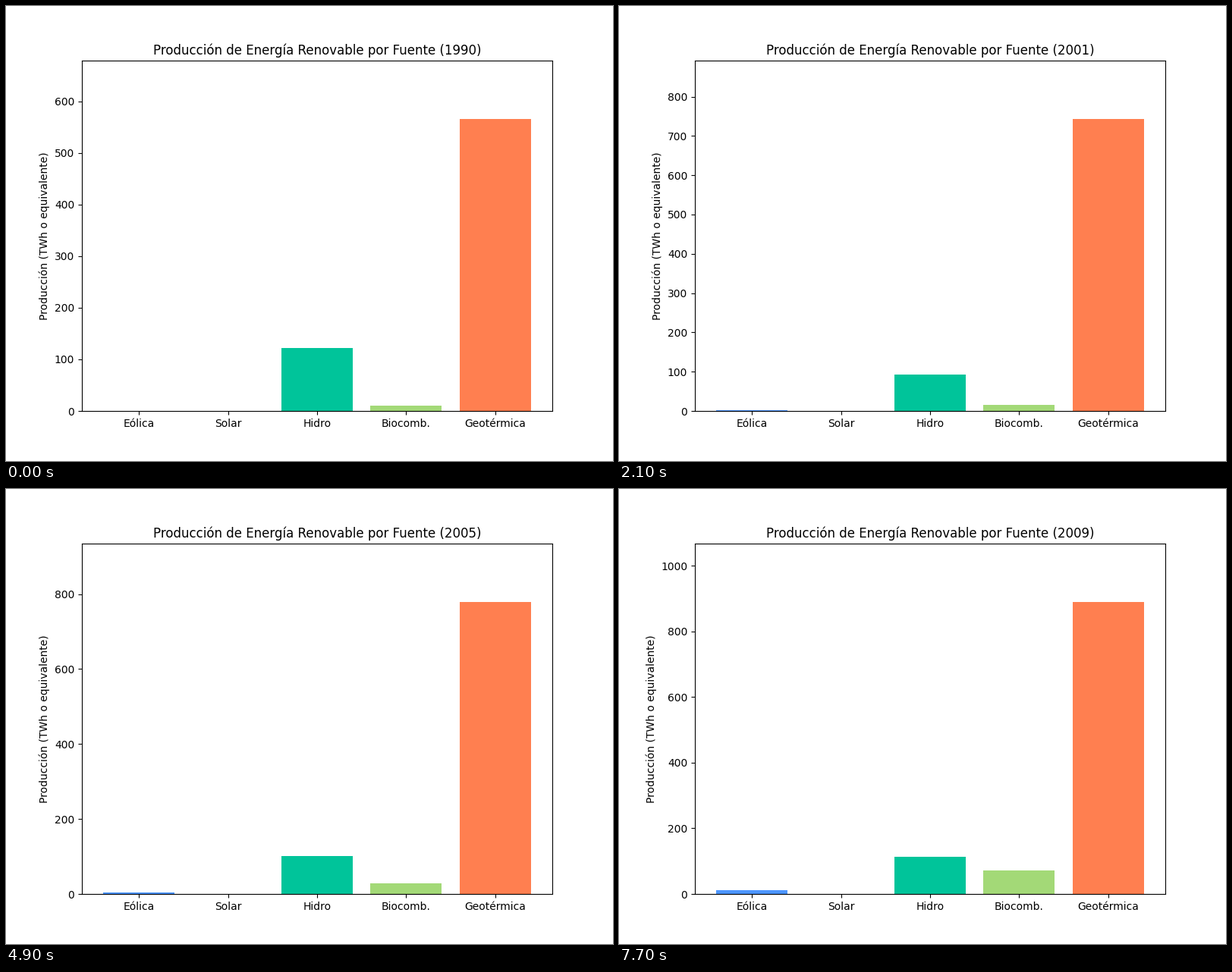
Recreate the animation shown at these times as a matplotlib script. Size 800 by 600 pixels, loop 8000 ms.

```python
import matplotlib.pyplot as plt
import numpy as np
from matplotlib.animation import FuncAnimation

TICK = 100   # ms per frame
HOLD = 7     # frames each year stays
LOOP = 80    # frames per loop
YEARS = [1990, 1995, *range(2000, 2010)]


def growth(start, rate):
    """Steady yearly growth, with its start value in 2000."""
    return lambda year: start * rate ** (year - 2000)


def trend(points):
    """Straight lines through a few key years."""
    return lambda year: np.interp(year, list(points), list(points.values()))


def log_trend(points):
    """Constant growth rates between a few key years."""
    line = trend({year: np.log(value) for year, value in points.items()})
    return lambda year: np.exp(line(year))


# label: (color, yearly output)
SOURCES = {
    "Eólica": ("#4d96ff", growth(1.25, 1.273)),
    "Solar": ("#ffd93d", growth(0.04, 1.38)),
    "Hidro": ("#00c49a", trend({1990: 122, 1995: 91, 2002: 93.9, 2009: 112.6})),
    "Biocomb.": ("#a3d977", log_trend({1990: 10.4, 2000: 13.7, 2002: 17.3,
                                       2005: 28.3, 2007: 46.4, 2009: 71.7})),
    "Geotérmica": ("#ff7f50", trend({1990: 566, 2000: 749, 2002: 737.2, 2004: 747.5,
                                     2005: 778.8, 2007: 820, 2009: 890})),
}
LABELS = list(SOURCES)
COLORS, OUTPUTS = zip(*SOURCES.values())

plt.rcParams["font.family"] = "DejaVu Sans"
fig, ax = plt.subplots(figsize=(8, 6), dpi=100)


def draw(frame):
    year = YEARS[frame // HOLD]
    values = [output(year) for output in OUTPUTS]
    ax.clear()
    ax.bar(LABELS, values, color=COLORS)
    ax.set_ylim(0, max(values) * 1.2)
    ax.set_ylabel("Producción (TWh o equivalente)")
    ax.set_title(f"Producción de Energía Renovable por Fuente ({year})")
    return []


anim = FuncAnimation(fig, draw, frames=LOOP, init_func=lambda: draw(0),
                     interval=TICK, repeat=True, repeat_delay=0)
plt.show()
```
